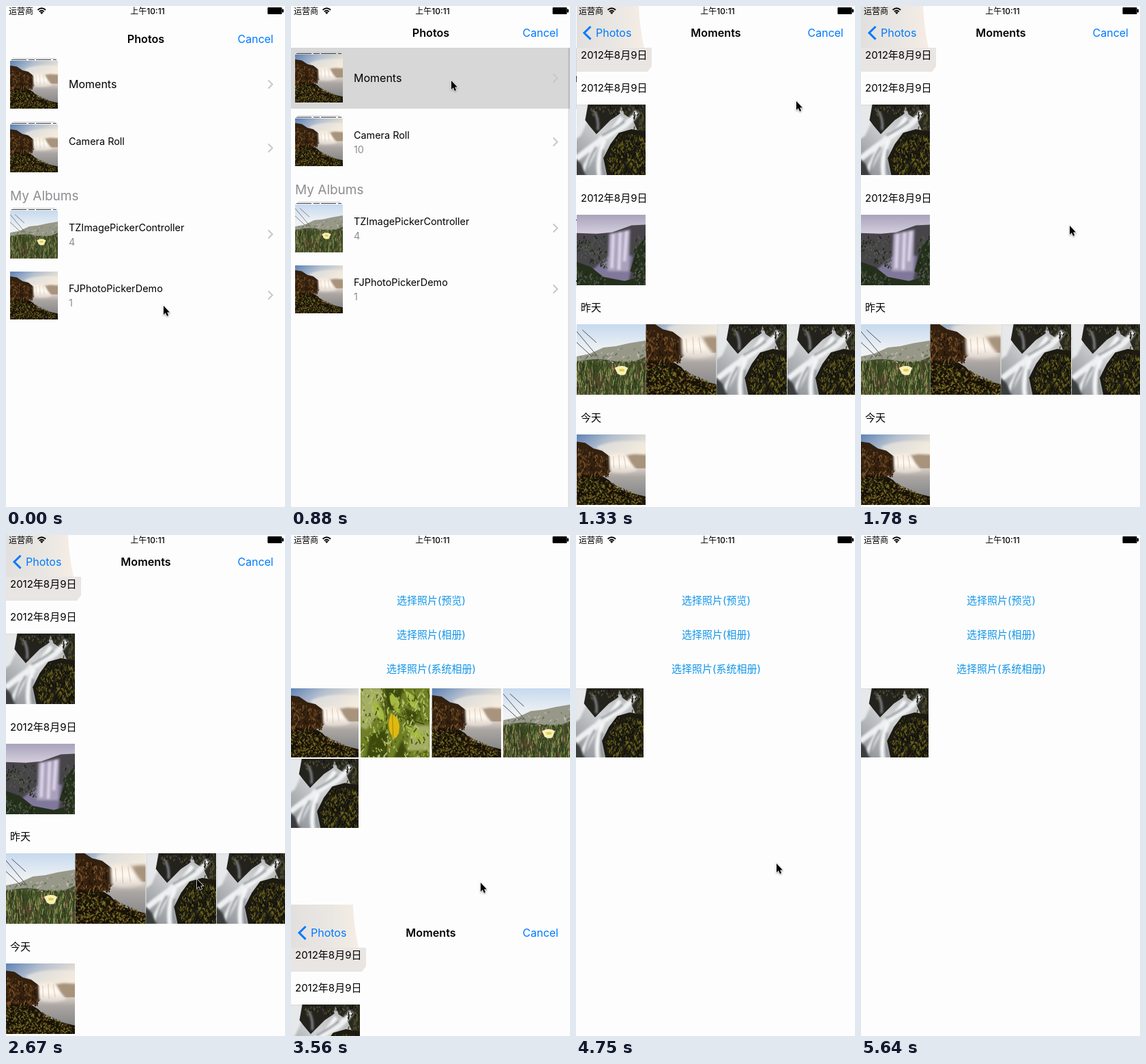
An HTML page that plays this animation: 409 px wide and 732 px high, repeating every 6090 ms.

```html
<!DOCTYPE html>
<html lang="zh">
<head>
<meta charset="utf-8">
<title>Photo picker</title>
<style>
  html, body { margin: 0; height: 100%; overflow: hidden; background: #fdfdfd; }
  svg { display: block; }
  text { font: 14.4px Inter, "Noto Sans CJK SC", "Noto Sans CJK", sans-serif; }
  .bar { font-size: 16px; }
  .title { font-size: 16.2px; font-weight: 600; }
  .mid { text-anchor: middle; }
  .blue { fill: #007aff; }
  .link { font-size: 15px; fill: #1296e8; text-anchor: middle; }
  .date { font-size: 15px; }
  .grey { fill: #8e8e93; }
  .status { font-size: 12px; }
  .page { fill: #fdfdfd; }
  .chevron { fill: none; stroke: #c7c7cc; stroke-width: 2; }
</style>
</head>
<body>
<svg id="stage" width="409" height="732" viewBox="0 0 409 732">
  <defs>
    <filter id="soft"><feGaussianBlur stdDeviation="1.6"/></filter>
    <linearGradient id="sky" x2=".8" y2=".6"><stop stop-color="#5a80b4"/><stop offset=".45" stop-color="#b4bfce"/><stop offset="1" stop-color="#f0e6d6"/></linearGradient>
    <linearGradient id="lake" x2="0" y2=".8"><stop stop-color="#d8cfc6"/><stop offset=".3" stop-color="#aaa5a2"/><stop offset="1" stop-color="#858688"/></linearGradient>
    <linearGradient id="mist" x2="0" y2="1"><stop stop-color="#f3e8da"/><stop offset=".5" stop-color="#fffaf2"/><stop offset="1" stop-color="#dbd2ca"/></linearGradient>
    <linearGradient id="pale" x2="0" y2="1"><stop stop-color="#c6d9ee"/><stop offset=".6" stop-color="#eff2f4"/></linearGradient>
    <linearGradient id="stream" x1="1" x2="0" y2="1"><stop stop-color="#a9abad"/><stop offset=".5" stop-color="#cfd1d3"/><stop offset="1" stop-color="#868b90"/></linearGradient>
    <linearGradient id="violet" x2="0" y2="1"><stop stop-color="#a9a3bb"/><stop offset=".3" stop-color="#d9d3e2"/></linearGradient>
    <linearGradient id="frost"><stop stop-color="#e2e0de"/><stop offset=".6" stop-color="#eae7e3"/><stop offset="1" stop-color="#f6ede4"/></linearGradient>

    <symbol id="river" viewBox="0 0 100 100" preserveAspectRatio="none">
      <path fill="url(#sky)" d="M0 0H100V60H0z"/>
      <path fill="#f6efe3" opacity=".6" filter="url(#soft)" d="M30 18Q55 6 100 10V32H45z"/>
      <path fill="#a8937c" filter="url(#soft)" d="M70 30L84 28 102 29V52H66z"/>
      <path fill="url(#lake)" d="M0 48H100V100H0z"/>
      <path fill="#33200f" d="M0 10L14 12 26 20 38 23 50 32 53 50 44 58 0 64z"/>
      <path fill="url(#mist)" filter="url(#soft)" d="M48 29Q60 24 73 29L79 40 88 51Q66 58 49 52z"/>
      <path fill="none" stroke="#c3ad97" opacity=".6" d="M54 31L55 48M62 29L63 50M69 30L72 48"/>
      <path fill="#1a1409" d="M0 56L18 58 32 55 48 65 58 76 76 82 100 88V100H0z"/>
    </symbol>
    <symbol id="falls" viewBox="0 0 100 100" preserveAspectRatio="none">
      <path fill="url(#stream)" d="M0 0H100V100H0z"/>
      <path fill="#e6e8ea" filter="url(#soft)" d="M0 0H17L20 18 8 44 0 50z"/>
      <path fill="#23221d" d="M18 0H66L62 14 50 22 40 32 30 42 20 30 14 22z"/>
      <path fill="#2a291d" d="M64 0H100V40L88 36 82 22 70 14z"/>
      <g fill="none" filter="url(#soft)">
        <path stroke="#eef0f1" stroke-width="8" d="M88 10Q74 32 54 38T24 70L8 102M56 38Q32 52 0 78"/>
        <path stroke="#f4f5f6" stroke-width="6" d="M66 18Q56 34 44 46M42 50Q30 74 34 102"/>
        <path stroke="#8c9196" stroke-width="3" d="M70 24Q54 36 38 44M30 60Q18 78 14 100M40 64Q36 80 42 100M26 8Q34 20 32 36"/>
      </g>
      <path fill="#1c1a11" d="M45 100L40 76 50 56 62 40 80 35 100 38V100z"/>
      <path fill="#3a3c3d" filter="url(#soft)" d="M-2 74L8 84 16 102H-2z"/>
    </symbol>
    <symbol id="cascade" viewBox="0 0 100 100" preserveAspectRatio="none">
      <path fill="url(#violet)" d="M0 0H100V100H0z"/>
      <path fill="#47454a" d="M0 26L30 27 52 25 80 15 100 14V100H0z"/>
      <g filter="url(#soft)">
        <path fill="#80789a" d="M22 80L48 58H82L76 96 40 96z"/>
        <path fill="#aaa2bc" d="M48 27L78 21 76 80H46z"/>
        <path fill="none" stroke="#dfd7ea" stroke-width="4" d="M54 27L52 76M64 25L62 78M73 23L70 66"/>
      </g>
      <path fill="#25301c" d="M0 66L22 74 40 88 70 94 100 86V100H0zM100 32L88 46 78 80 100 90z"/>
    </symbol>
    <symbol id="meadow" viewBox="0 0 100 100" preserveAspectRatio="none">
      <path fill="url(#pale)" d="M0 0H100V60H0z"/>
      <path fill="#979888" d="M0 46L20 42 40 33 58 31 76 27 100 23V70H0z"/>
      <path fill="#42502a" d="M0 54Q30 46 54 52T100 46V100H0z"/>
      <path fill="none" stroke="#43474a" stroke-width=".9" d="M0 8L32 46M0 24L24 46M10 8L30 26"/>
    </symbol>
    <symbol id="leaf" viewBox="0 0 100 100" preserveAspectRatio="none">
      <path fill="#6f7f26" d="M0 0H100V100H0z"/>
      <g filter="url(#soft)">
        <path fill="#b3bb76" opacity=".8" d="M0 0H32L24 40 8 60 0 56zM74 54H100V90H68z"/>
        <path fill="#3a480f" d="M34 0H62L52 34 38 30zM14 66L38 60 36 100H8zM62 28L84 36 74 60zM60 74L70 100H48z"/>
      </g>
      <path fill="#a3b940" d="M42 6Q60 12 56 36 40 28 42 6zM66 4Q86 14 82 32 64 22 66 4zM16 18Q36 26 34 48 16 40 16 18zM68 56Q88 58 92 78 72 76 68 56z"/>
      <path fill="none" stroke="#39420f" stroke-width="1.5" d="M30 0Q42 34 36 100M46 38L92 52"/>
    </symbol>
    <symbol id="stack" viewBox="0 0 70 5">
      <path fill="none" stroke="#c9cdd0" d="M4 .5H66"/>
      <path fill="none" stroke="#3b3b39" d="M2 2.5H68" stroke-dasharray="22 3 9 2"/>
    </symbol>
  </defs>

  <rect class="page" width="409" height="732"/>
  <text class="link" x="205.5" y="101">选择照片(预览)</text>
  <text class="link" x="205.5" y="151">选择照片(相册)</text>
  <text class="link" x="205.5" y="201">选择照片(系统相册)</text>
  <g id="before"></g>
  <g id="after"></g>

  <g id="modal">
    <rect class="page" y="-2" width="409" height="734"/>
    <g id="albums">
      <rect id="highlight" y="61" width="540" height="89" fill="#d7d7d7"/>
      <text class="bar" x="92" y="111">Moments</text>
      <text x="92" y="194">Camera Roll</text>
      <text class="grey" id="count" x="92" y="215">10</text>
      <text class="grey" x="6" y="275" style="font-size:19px">My Albums</text>
      <text x="92" y="320">TZImagePickerController</text>
      <text class="grey" x="92" y="341">4</text>
      <text x="92" y="409">FJPhotoPickerDemo</text>
      <text class="grey" x="92" y="430">1</text>
    </g>
    <g id="moments">
      <rect id="shade" x="-3" y="61" width="3" height="671"/>
      <svg id="timeline" y="-2" width="409" height="734" viewBox="0 -2 409 734">
        <rect class="page" y="-2" width="409" height="734"/>
        <path fill="url(#frost)" d="M0-2H91Q92 30 99 61H0z"/>
        <path fill="#e8e5e2" d="M0 61H110V88L104 96H0z"/>
      </svg>
    </g>
    <text class="title mid" id="albumsTitle" x="205" y="45">Photos</text>
    <text class="title mid" id="momentsTitle" x="205" y="45">Moments</text>
    <g id="back">
      <path d="M21.5 30L12 39.3 21.5 48.6" fill="none" stroke="#007aff" stroke-width="3"/>
      <text class="bar blue" x="29" y="45">Photos</text>
    </g>
    <text class="bar blue" x="339.5" y="45">Cancel</text>
  </g>

  <g id="hud">
    <rect x="150" y="325" width="110" height="80" rx="6" fill="#757575"/>
    <g id="spinner" transform="translate(204.5 354.5)" stroke="#fff" stroke-width="3" stroke-linecap="round"></g>
    <text class="mid" x="205" y="396" fill="#fff" style="font-size:16px">正在处理...</text>
  </g>

  <text class="status" x="4" y="11.5">运营商</text>
  <g fill="none" stroke="#000" stroke-width="1.9">
    <path d="M46.5 5.8Q52.3 .8 58.1 5.8M48.8 8.2Q52.3 5.2 55.8 8.2"/>
    <path fill="#000" stroke="none" d="M50 9.5Q52.3 7.7 54.6 9.5L52.3 12z"/>
  </g>
  <text class="status mid" x="207.5" y="11.5" style="font-weight:500">上午10:11</text>
  <path d="M384 2.5H404V11.5H384zM405 5H406.5V9H405z" stroke="#000" stroke-linejoin="round"/>

  <g id="cursor">
    <path transform="scale(.86)" d="M0 0V15L3.4 11.9 5.8 17.4 8.3 16.3 6 11H10.4z" stroke="#fff" stroke-width="1.6" paint-order="stroke" style="filter:drop-shadow(.5px 1px 1px #0006)"/>
  </g>
</svg>

<script>
const $ = id => document.getElementById(id);
const add = (id, markup) => $(id).insertAdjacentHTML('beforeend', markup);

// Seeded strokes that give the pictures their texture.
let seed = 7;
const random = () => (seed = seed * 16807 % 2147483647) / 2147483647;
function grain(id, count, dx, dy, width, colors, inside) {
  for (const color of colors) {
    let d = '';
    for (let i = 0; i < count; i++) {
      const x = random() * 100, y = random() * 100, k = .4 + random();
      if (inside(x, y)) d += `M${x.toFixed(1)} ${y.toFixed(1)}l${(dx * k * (random() * 2 - 1)).toFixed(1)} ${(dy * k).toFixed(1)}`;
    }
    add(id, `<path d="${d}" fill="none" stroke="${color}" stroke-width="${width}"/>`);
  }
}
const shore = x => x < 32 ? 58 : 58 + (x - 32) * .45;
grain('river', 300, 3, 4, 1.5, ['#5e3d1c', '#1d1208', '#7a5328', '#432a13'], (x, y) => x < 47 && y > 14 + x * .4 && y < 58);
grain('river', 480, 3, 2, 1.5, ['#4d4a15', '#2e2c0f', '#6f4c1e', '#0f0c05', '#777025'], (x, y) => y > shore(x) + 2);
grain('falls', 420, 3, 4, 1.5, ['#4a4512', '#2a2a20', '#6b6119', '#0f0f0b'], (x, y) => y > 42 && x > 45 + Math.abs(y - 78) * .42);
grain('falls', 200, 3, 4, 1.5, ['#4b4a42', '#0e0e0c', '#504d22'], (x, y) => x > 22 && y < 13 || x > 84 && y < 34);
grain('cascade', 260, 3, 3, 1.6, ['#3a4630', '#1d2617', '#545a48'], (x, y) => y > 30 && (x < 44 && Math.abs(y - 64 - x * .4) > 8 || x > 84));
grain('meadow', 140, 5, 3, 1.6, ['#7a7d69', '#b9b7a8', '#666c55'], (x, y) => y > 46 - x * .2 && y < 52);
grain('meadow', 330, 3, 10, 1.2, ['#66793a', '#26341a', '#70443a', '#8b9457', '#34451f'], (x, y) => y > 51);
grain('leaf', 110, 4, 5, 1.8, ['#93a53c', '#4a5a14', '#b9c070'], () => true);
add('meadow', '<path fill="#f5f0b8" d="M56 62Q66 56 75 62L71 71Q65 74 60 70z"/><ellipse cx="66" cy="65" rx="4" ry="2" fill="#e2cf4c"/>');
add('leaf', '<path fill="#dfb90e" d="M44 36Q60 46 55 64 51 76 46 70 39 60 41 46z"/><path stroke="#a98507" d="M46 38L47 72"/>');

const photo = (id, name, x, y, w, h = w) =>
  add(id, `<use href="#${name}" x="${x}" y="${y}" width="${w}" height="${h}"/>`);

['river', 'leaf', 'river', 'meadow', 'falls'].forEach((name, i) =>
  photo('before', name, -2.5 + i % 4 * 104.5, i < 4 ? 224 : 327, 101.5, 101));
photo('after', 'falls', -2.5, 224, 101.5, 101);

[['river', 71], ['river', 164], ['meadow', 290], ['river', 379]].forEach(([name, y], i) => {
  if (i < 3) photo('albums', 'stack', 6, y - 4, 70, 5);
  photo('albums', name, 6, y, 70);
  add('albums', `<path class="chevron" d="M384.5 ${y + 28.5}l6 6-6 6"/>`);
});

[['2012年8月9日', 72], ['2012年8月9日', 120, 'falls'], ['2012年8月9日', 281, 'cascade'],
 ['昨天', 441, 'meadow', 'closeup', 'falls', 'falls'], ['今天', 602, 'river']].forEach(([label, y, ...names]) => {
  add('timeline', `<text class="date" x="6" y="${y + 4.8}">${label}</text>`);
  names.forEach((name, i) => {
    const x = -2 + i * 103.6;
    if (name !== 'closeup') return photo('timeline', name, x, y + 24, 103);
    add('timeline', `<svg x="${x}" y="${y + 24}" width="103" height="103" viewBox="6 14 84 84"><use href="#river" width="100" height="100"/></svg>`);
  });
});

for (let i = 0; i < 12; i++)
  add('spinner', `<path d="M0-9V-16" transform="rotate(${300 - i * 30})" opacity="${Math.max(.25, 1 - i * .12)}"/>`);

const LOOP = 6090;
const ticks = [0, 140, 290, 440, 590, 730, 880, 1030, 1180, 1330, 1480, 1630, 1780, 1930, 2080, 2230,
  2520, 2670, 3560, 3710, 3860, 4010, 4160, 4750, 4900, 5050];
const route = [[0, 231, 438], [140, 231, 430], [730, 235, 109], [1030, 235, 109], [1330, 323, 139], [2230, 288, 503],
  [2670, 280, 503], [3560, 278, 508], [4010, 288, 530], [4160, 288, 530], [4750, 294, 480], [4900, 307, 352], [LOOP, 307, 352]];

// Remaining share of a critically damped move, t ms after its start.
const spring = t => t < 0 ? 1 : (1 + t * .01826) * Math.exp(-t * .01826);
const move = (id, x, y = 0) => $(id).setAttribute('transform', `translate(${Math.round(x)} ${Math.round(y)})`);
const show = (id, opacity) => $(id).style.opacity = +opacity;

function pointer(t) {
  const i = route.findIndex(p => p[0] > t);
  const [t0, x0, y0] = route[i - 1], [t1, x1, y1] = route[i];
  const k = (t - t0) / (t1 - t0), ease = k * k * (3 - 2 * k);
  return [x0 + (x1 - x0) * ease, y0 + (y1 - y0) * ease];
}

function draw(t) {
  const left = spring(t - 880);
  move('modal', 0, 734 * (t < 2000 ? spring(t + 350) : 1 - spring(t - 3416)));
  move('albums', -122 * (1 - left));
  move('moments', 409 * left);
  move('albumsTitle', -149 * (1 - left));
  move('momentsTitle', 150 * left);
  move('back', 100 * left);
  move('cursor', ...pointer(t));
  show('albumsTitle', left > .01 ? left : 0);
  show('momentsTitle', 1 - left);
  show('back', 1 - left);
  show('shade', .1 * left);
  show('moments', t >= 880);
  show('count', t >= 140);
  show('highlight', t >= 880);
  show('hud', t >= 4010 && t < 4160);
  show('before', t < 4160);
  show('after', t >= 4160);
  show('cursor', t < 5050);
}

const start = performance.now();
let shown;
function frame() {
  const t = (performance.now() - start) % LOOP;
  const tick = ticks.findLast(time => time <= t);
  if (tick !== shown) draw(shown = tick);
  requestAnimationFrame(frame);
}
frame();
</script>
</body>
</html>
```
